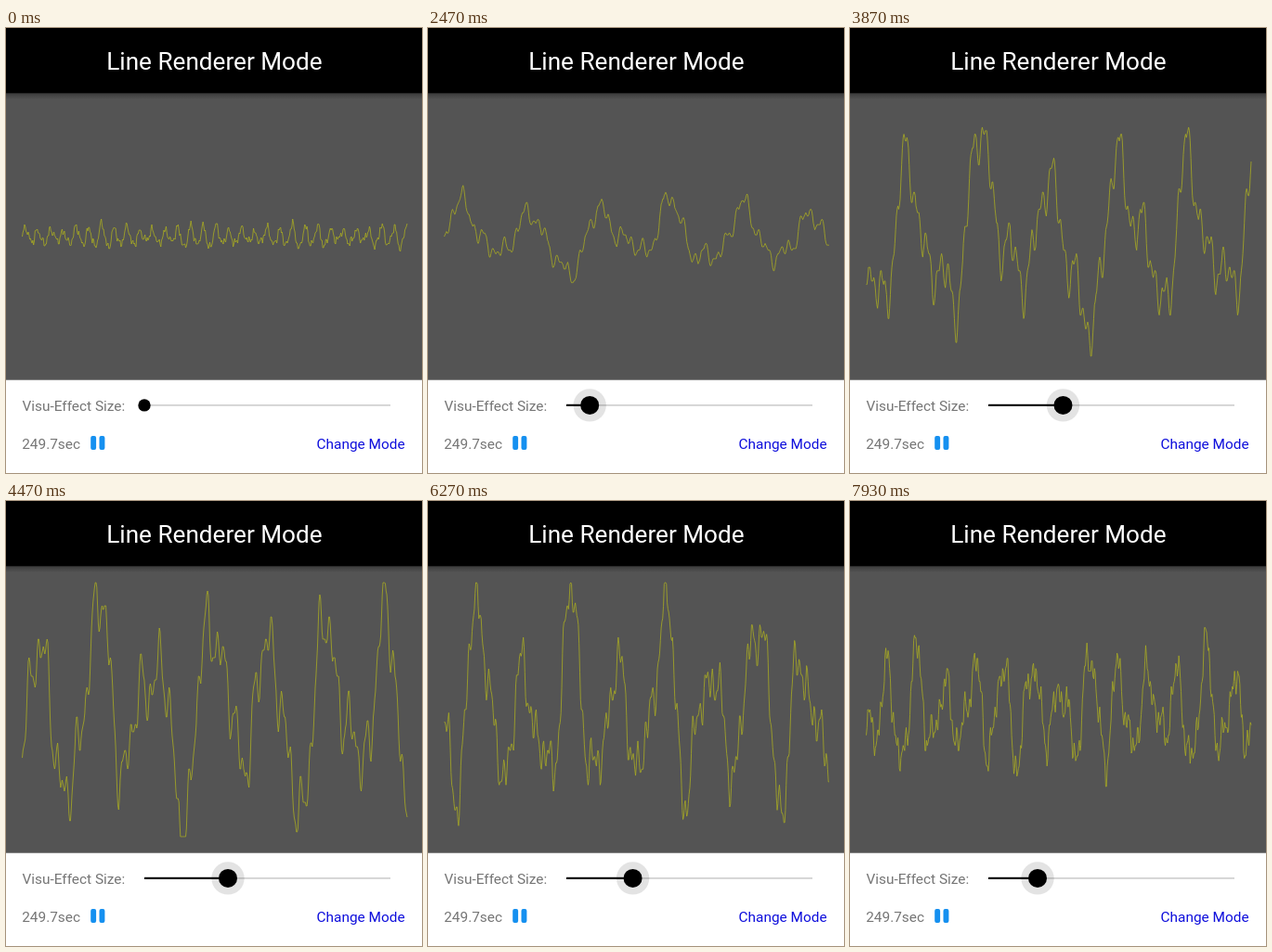
An HTML page that plays this animation: 448 px wide and 480 px high, repeating every 8000 ms.

```html
<!DOCTYPE html>
<html lang="en">
<head>
<meta charset="utf-8">
<title>Line Renderer Mode</title>
<style>
  html, body { margin: 0; width: 100%; height: 100%; overflow: hidden; background: #fff; }
  svg { display: block; width: 100%; height: 100%; }
  text { font: 15.4px Roboto, sans-serif; fill: #757575; }
  .title { font-size: 26.15px; fill: #fff; text-anchor: middle; }
  .link { fill: #0f0fdc; text-anchor: end; }
  #wave { fill: none; stroke: #a9ab22; stroke-width: .8; stroke-linejoin: round; }
</style>
</head>
<body>
<svg viewBox="0 0 448 480">
  <defs>
    <linearGradient id="shade" x2="0" y2="1">
      <stop offset="0" stop-color="#000" stop-opacity=".32"/>
      <stop offset="1" stop-color="#000" stop-opacity="0"/>
    </linearGradient>
  </defs>
  <rect width="448" height="379.7" fill="#545454"/>
  <rect y="70" width="448" height="7" fill="url(#shade)"/>
  <rect width="448" height="70.3" fill="#000"/>
  <text class="title" x="224.4" y="45.1">Line Renderer Mode</text>
  <path id="wave"/>
  <text x="17.5" y="413.3">Visu-Effect Size:</text>
  <rect x="149" y="406" width="265" height="1.8" fill="#d3d3d3"/>
  <rect id="fill" x="149" y="405.8" width="0" height="2.2"/>
  <circle id="halo" cy="406.9" r="17.7" fill="#000" opacity=".11"/>
  <circle id="thumb" cy="406.9"/>
  <text x="17.2" y="453.8">249.7sec</text>
  <g fill="#1590f0">
    <rect x="91.2" y="440" width="5.9" height="15" rx="2"/>
    <rect x="100.5" y="440" width="5.9" height="15" rx="2"/>
  </g>
  <text class="link" x="429.6" y="453.8">Change Mode</text>
</svg>
<script>
const LOOP = 8000, STEPS = 120, TAU = 2 * Math.PI;
const LEFT = 17.5, RIGHT = 432, SAMPLES = 512, MID = 225, TOP = 88, BOTTOM = 362;
const get = id => document.getElementById(id);
const wave = get('wave'), fill = get('fill'), halo = get('halo'), thumb = get('thumb');

// Keys along the loop: [step, value].
const loudness = [[0, 14], [3, 108], [13, 60], [20, 14], [23, 42], [37, 44], [50, 92],
  [67, 132], [84, 132], [103, 108], [119, 70]];
const thumbX = [[0, 149], [30, 149], [50, 221], [67, 239], [84, 229], [103, 213], [119, 202]];

// Passages of the music: pulse length and the place of one crest, in px.
const passages = [
  { step: 0, period: 13.7, crest: 103 },
  { step: 8, period: 40, crest: 50 },
  { step: 20, period: 14.2, crest: 145 },
  { step: 50, period: 75.5, crest: 33 },
  { step: 67, period: 62, crest: 36 },
  { step: 84, period: 62.3, crest: 28 },
  { step: 103, period: 50, crest: 61 },
  { step: 119, period: 31.2, crest: 40 },
];
const DRIFT = 23;

// Overtones as [share of the pulse length, gain].
const overtones = [[1.9, .14], [.53, .2], [.29, .16], [.155, .12], [.085, .08]];

// Steps at which the picture stands still.
const held = new Set([6, 13, 22, 24, 31]);

function at(keys, step) {
  let k = 1;
  while (k < keys.length - 1 && keys[k][0] < step) k++;
  const [s0, v0] = keys[k - 1], [s1, v1] = keys[k];
  return v0 + (v1 - v0) * (step - s0) / (s1 - s0);
}

function random(seed) {
  let s = seed * 7919 + 17;
  const next = () => {
    s = (s * 1664525 + 1013904223) % 4294967296;
    return s / 4294967296;
  };
  for (let k = 0; k < 5; k++) next();
  return next;
}

function music(step) {
  const rnd = random(step), amp = at(loudness, step);
  const away = p => Math.abs(p.step - step);
  const { step: from, period, crest } = passages.reduce((a, b) => away(b) < away(a) ? b : a);
  const shift = crest + (step - from) * DRIFT;
  const parts = overtones.map(([share, gain]) => ({
    f: TAU / (period * share * (.93 + rnd() * .14)),
    gain: gain * (.8 + rnd() * .4),
    phase: rnd() * TAU,
  }));
  const swell = rnd() * TAU;
  return x => {
    const pulse = .62 * Math.cos(TAU * (x - shift) / period) * (1 + .35 * Math.sin(x / 17 + swell));
    const rest = parts.reduce((sum, p) => sum + p.gain * Math.sin(p.f * x + p.phase), 0);
    return amp * (pulse + rest);
  };
}

// Samples have few levels, so a larger effect size shows coarser steps.
function drawWave(step) {
  const signal = music(step), grain = 1 + (at(thumbX, step) - 149) / 30;
  let d = '';
  for (let i = 0; i < SAMPLES; i++) {
    const x = LEFT + (RIGHT - LEFT) * i / (SAMPLES - 1);
    const y = MID - Math.round(signal(x) / grain) * grain;
    d += (i ? 'L' : 'M') + x.toFixed(2) + ' ' + Math.max(TOP, Math.min(BOTTOM, y)).toFixed(1);
  }
  wave.setAttribute('d', d);
}

function drawSlider(step) {
  const x = at(thumbX, step), dragging = step >= 29;
  fill.setAttribute('width', x - 149);
  thumb.setAttribute('cx', x);
  thumb.setAttribute('r', dragging ? 10 : 6.7);
  halo.setAttribute('cx', x);
  halo.style.display = dragging ? '' : 'none';
}

let shown = -1;
function draw(now) {
  let step = Math.min(STEPS - 1, Math.floor((now % LOOP + 4) * STEPS / LOOP));
  if (held.has(step)) step--;
  if (step !== shown) {
    shown = step;
    drawWave(step);
    drawSlider(step);
  }
}

const start = performance.now();
function tick() {
  draw(performance.now() - start);
  requestAnimationFrame(tick);
}
tick();
</script>
</body>
</html>
```
